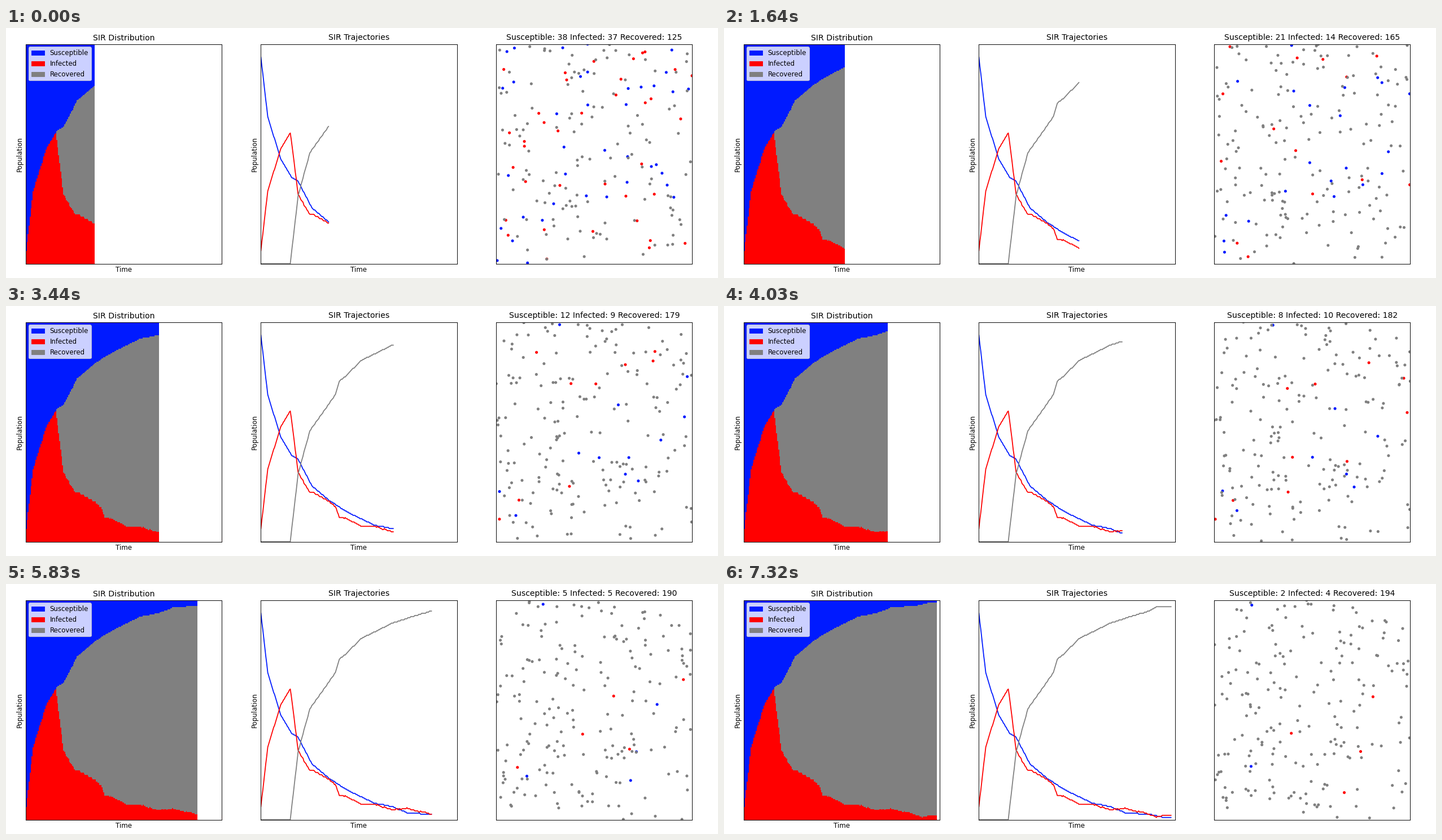
Animation, 1261 px wide and 444 px high, one loop 7.34 s. Source, as a matplotlib script:

```python
import numpy as np
import matplotlib.pyplot as plt
from matplotlib.animation import FuncAnimation
from matplotlib.patches import Patch, Polygon, Rectangle

W, H, DPI = 1261, 444, 64
PX = 72 / DPI                      # points per pixel
TICK, LOOP, STEP = 20, 7340, 149.39
N = 200                            # population and number of time columns
LEFTS, TOP, BOTTOM, WIDTH = (35.2, 451.4, 868.2), 28.6, 418.6, 347.2
RIGHT = LEFTS[2] + WIDTH
BLUE, RED, GRAY = "#001aff", "#ff0000", "#808080"
SHADES = np.array([(0, 26, 255), (255, 0, 0), (128, 128, 128)], np.uint8)
TITLE, LABEL = 14.05 * PX, 11.75 * PX


def columns(step):
    """Time columns on show; the simulation slows down as it runs."""
    return round(70.25 + 3.13 * step - 0.0111 * step ** 2)


def counts(*points):
    """Whole numbers along straight runs between (time, count) points."""
    return np.rint(np.interp(np.arange(N), *zip(*points))).astype(int)


def fold(p, lo, hi):
    """Bounce positions off both walls."""
    q = (p - lo) % (2 * (hi - lo))
    return lo + np.minimum(q, 2 * (hi - lo) - q)


# The infected are whoever is neither susceptible nor recovered.
S = counts((0, 188), (7, 134), (20, 96), (31, 79), (38, 75), (52, 51),
           (69, 38), (88, 27), (116, 15), (134, 12), (150, 6), (174, 5),
           (189, 2))
R = counts((30, 0), (38, 62), (50, 101), (69, 125), (76, 134), (80, 146),
           (88, 152), (102, 165), (116, 171), (134, 179), (158, 186),
           (174, 190), (181, 194))
I = N - S - R

# People fall ill and recover in order, from the last index to the first.
order = np.arange(N)
rng = np.random.default_rng(11)
pos = rng.uniform((LEFTS[2], TOP), (RIGHT, BOTTOM), (N, 2))
vel = rng.uniform(-1, 1, (N, 2))
# The last six to fall ill stand out, so their paths are set.
pos[:6] = (1030, 28.6), (870, 413), (1171, 279), (1143, 246), (1064, 300), (1100, 274)
vel[:6] = (-.75, .07), (.5, .79), (-.17, -.62), (-.35, .98), (.5, -.02), (-.75, -.07)

plt.rcParams["font.family"] = "DejaVu Sans"
fig = plt.figure(figsize=(W / DPI, H / DPI), dpi=DPI, facecolor="white")


def panel(left, title, labels=True):
    ax = fig.add_axes([left / W, 1 - BOTTOM / H, WIDTH / W, (BOTTOM - TOP) / H])
    ax.set(xticks=[], yticks=[], xlim=(0, N), ylim=(0, N))
    for spine in ax.spines.values():
        spine.set_linewidth(0.95 * PX)
    text = ax.set_title(title, fontsize=TITLE, pad=7.1 * PX, y=1.0)
    if labels:
        ax.set_xlabel("Time", fontsize=LABEL, labelpad=4.7 * PX)
        ax.set_ylabel("Population", fontsize=LABEL, labelpad=4.7 * PX)
    return ax, text


# Distribution: fully drawn, with the future covered in white
dist, _ = panel(LEFTS[0], "SIR Distribution")
level = order[:, None]
area = np.where(level < I, 1, np.where(level < I + R, 2, 0))
dist.imshow(SHADES[area], origin="lower", extent=(0, N, 0, N),
            aspect="auto", interpolation="nearest")
future = dist.add_patch(Rectangle((0, 0), N, N, fc="white", lw=0))
legend = dist.legend(
    handles=[Patch(color=c, label=s, lw=0.9 * PX) for c, s in
             ((BLUE, "Susceptible"), (RED, "Infected"), (GRAY, "Recovered"))],
    loc="upper left", fontsize=LABEL, borderaxespad=0.4)
legend.get_frame().set_linewidth(1.1 * PX)

# Trajectories
traj, _ = panel(LEFTS[1], "SIR Trajectories")
curves = [(traj.plot([], [], color=c, lw=1.77 * PX)[0], v)
          for c, v in ((BLUE, S), (RED, I), (GRAY, R))]

# Moving people
room, tally = panel(LEFTS[2], "", labels=False)
room.set(xlim=(LEFTS[2], RIGHT), ylim=(BOTTOM, TOP))
dots = room.scatter(*pos.T, s=(5.1 * PX) ** 2, c=[GRAY] * N, linewidths=0)

# Mouse pointer
arrow = np.array([(0, 0), (0, 11), (2.5, 8.8), (4.4, 12.4), (6, 11.6),
                  (4.3, 8.1), (7.6, 8)])
pointer = Polygon((1239.3, H - 432.3) + arrow * (1, -1), transform=None,
                  fc="black", ec="white", lw=0.5 * PX)
fig.add_artist(pointer)


def draw(frame):
    step = int((frame * TICK + 17) / STEP)
    cols = columns(step)
    now = cols - 1

    future.set_x(cols)
    for line, values in curves:
        line.set_data(order[:cols], values[:cols])

    path = pos + vel * (cols - columns(0))
    dots.set_offsets(fold(path, np.array((LEFTS[2], TOP)),
                          np.array((RIGHT, BOTTOM))))
    state = np.where(order < S[now], 0, np.where(order < N - R[now], 1, 2))
    dots.set_facecolor(SHADES[state] / 255)

    tally.set_text(f"Susceptible: {S[now]} Infected: {I[now]} Recovered: {R[now]}")
    pointer.set_visible(13 <= step <= 18)
    return []


anim = FuncAnimation(fig, draw, frames=LOOP // TICK, init_func=lambda: draw(0),
                     interval=TICK, repeat=True, repeat_delay=0, blit=False)
plt.show()
```
